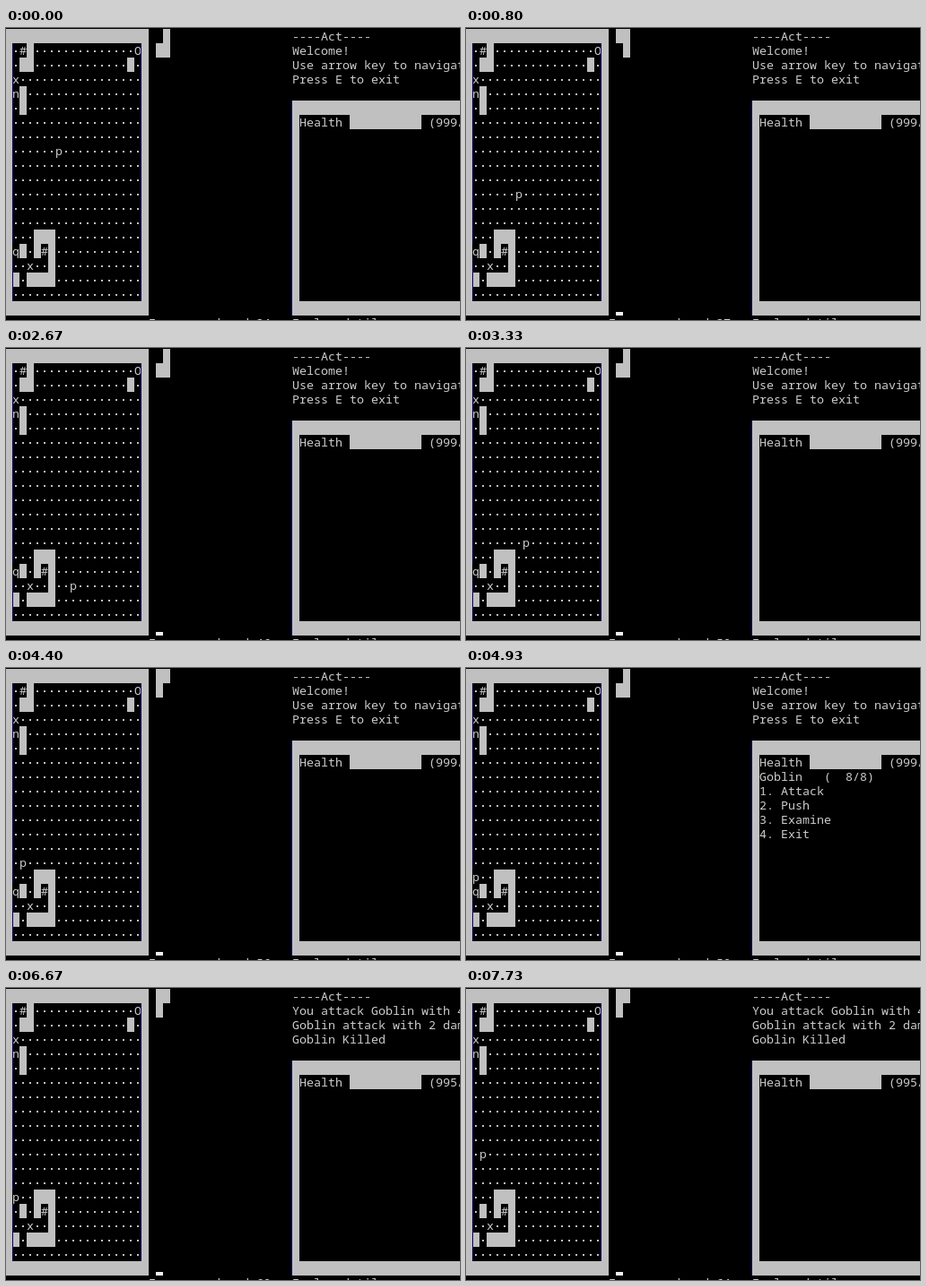
Write an HTML page that moves like this. It is 506x326 px and loops after 7.79 s.

```html
<!DOCTYPE html>
<html lang="en">
<head>
<meta charset="utf-8">
<title>Console dungeon</title>
<style>
  html, body { margin: 0; width: 100%; height: 100%; overflow: hidden; background: #000; }
  svg { display: block; }
  text { font: 13.333px "Noto Sans Mono", "DejaVu Sans Mono", monospace; fill: #ccc; white-space: pre; }
  rect { shape-rendering: crispEdges; }
</style>
</head>
<body>
<svg id="stage" width="506" height="326" viewBox="0 0 506 326"></svg>
<script>
const LOOP = 7790, CW = 8, CH = 16, GRAY = "#c0c0c0", EDGE = "#000070";
const stage = document.getElementById("stage");
const colX = c => c * CW - 1;
const rowY = r => r * CH + 1;

function add(tag, attrs, parent = stage) {
  const el = document.createElementNS("http://www.w3.org/2000/svg", tag);
  for (const k in attrs) el.setAttribute(k, attrs[k]);
  parent.appendChild(el);
  return el;
}
const box = (x, y, width, height, fill, parent) => add("rect", { x, y, width, height, fill }, parent);
const block = (c, r, w = 1, h = 1) => box(colX(c), rowY(r), w * CW, h * CH, GRAY);
function write(c, r, str = "", parent) {
  const el = add("text", { x: colX(c), y: rowY(r) + 13 }, parent);
  el.textContent = str;
  return el;
}
function setText(el, str) {
  if (el.textContent !== str) el.textContent = str;
}
const show = (el, on) => el.setAttribute("visibility", on ? "visible" : "hidden");

// A letter that hides the floor beneath it
function actor(ch) {
  const g = add("g", {});
  box(colX(0), rowY(0), CW, CH, "#000", g);
  write(0, 0, ch, g);
  return g;
}
const place = (el, c, r) => el.setAttribute("transform", `translate(${c * CW} ${r * CH})`);

// Map: only rows and columns that differ from plain floor
const rooms = {
  1: ".#@..............O", 2: ".@@.............@.", 3: "x", 4: "n@", 5: ".@",
  14: "...@@@", 15: ".@.@#@", 16: "..x..@", 17: "@.@@@@"
};
for (let r = 1; r <= 18; r++) {
  [...(rooms[r] || "").padEnd(18, ".")].forEach((ch, i) => {
    const c = i + 1;
    if (ch === "@") block(c, r);
    else if (ch === ".") box(colX(c) + 3, rowY(r) + 8, 2, 2, GRAY);
    else write(c, r, ch);
  });
}
block(0, 0, 20);
block(0, 19, 20);
block(0, 1, 1, 18);
block(19, 1, 1, 18);
box(colX(1), rowY(1), 1, 18 * CH, EDGE);
box(colX(19) - 1, rowY(1), 1, 18 * CH, EDGE);

// Status panel
block(40, 5, 24);
block(40, 19, 24);
block(40, 6, 1, 13);
box(colX(40) - 1, rowY(5), 1, 15 * CH, EDGE);
write(40, 0, "----Act----");
write(41, 6, "Health");
block(48, 6, 10);
const health = write(59, 6);
const log = [1, 2, 3].map(r => write(40, r));
const menu = add("g", {});
const foe = write(41, 7, "", menu);
["1. Attack", "2. Push", "3. Examine", "4. Exit"].forEach((s, i) => write(41, 8 + i, s, menu));

const counter = write(20, 20);
write(40, 20, "Explored tiles");

const goblin = actor("q");
place(goblin, 1, 15);
const hero = actor("p");
const cursor = box(colX(21), 317, CW, 4, "#f0f0f0");

// Spinner corners in clockwise order; one is dark each turn
const corners = [[21, 0], [22, 0], [22, 1], [21, 1]].map(([c, r]) => block(c, r));

const keys = "dddddddddrruuuulllllllldaauuur";
const times = [
  600, 670, 800, 1000, 1330, 1470, 1670, 1870, 2000, 2330,
  2530, 2670, 2870, 3000, 3130, 3270, 3470, 3600, 3730, 3930,
  4070, 4400, 4530, 4800, 6070, 6600, 7200, 7330, 7530, 7670
];
const steps = { u: [0, -1], d: [0, 1], l: [-1, 0], r: [1, 0], a: [0, 0] };
const welcome = ["Welcome!", "Use arrow key to navigate", "Press E to exit"];
const fight = ["You attack Goblin with 4 damage", "Goblin attack with 2 damage"];

function draw(t) {
  let c = 7, r = 8, turn = 0, hits = 0;
  while (turn < times.length && t >= times[turn]) {
    const key = keys[turn++];
    c += steps[key][0];
    r += steps[key][1];
    if (key === "a") hits++;
  }
  place(hero, c, r);
  corners.forEach((el, i) => show(el, i !== turn % 4));
  setText(counter, "Frame rendered " + (34 + turn));

  const lines = hits ? [...fight, hits > 1 ? "Goblin Killed" : ""] : welcome;
  log.forEach((el, i) => setText(el, lines[i]));
  setText(health, `(${999 - 2 * hits}/999)`);
  setText(foe, `Goblin   (  ${8 - 4 * hits}/8)`);
  show(goblin, hits < 2);
  show(menu, t >= 4870 && hits < 2);
  show(cursor, t >= 70 && !(t >= 5870 && t < 5930));
}

const start = performance.now();
function tick(now) {
  draw(Math.max(0, now - start) % LOOP);
  requestAnimationFrame(tick);
}
draw(0);
requestAnimationFrame(tick);
</script>
</body>
</html>
```
